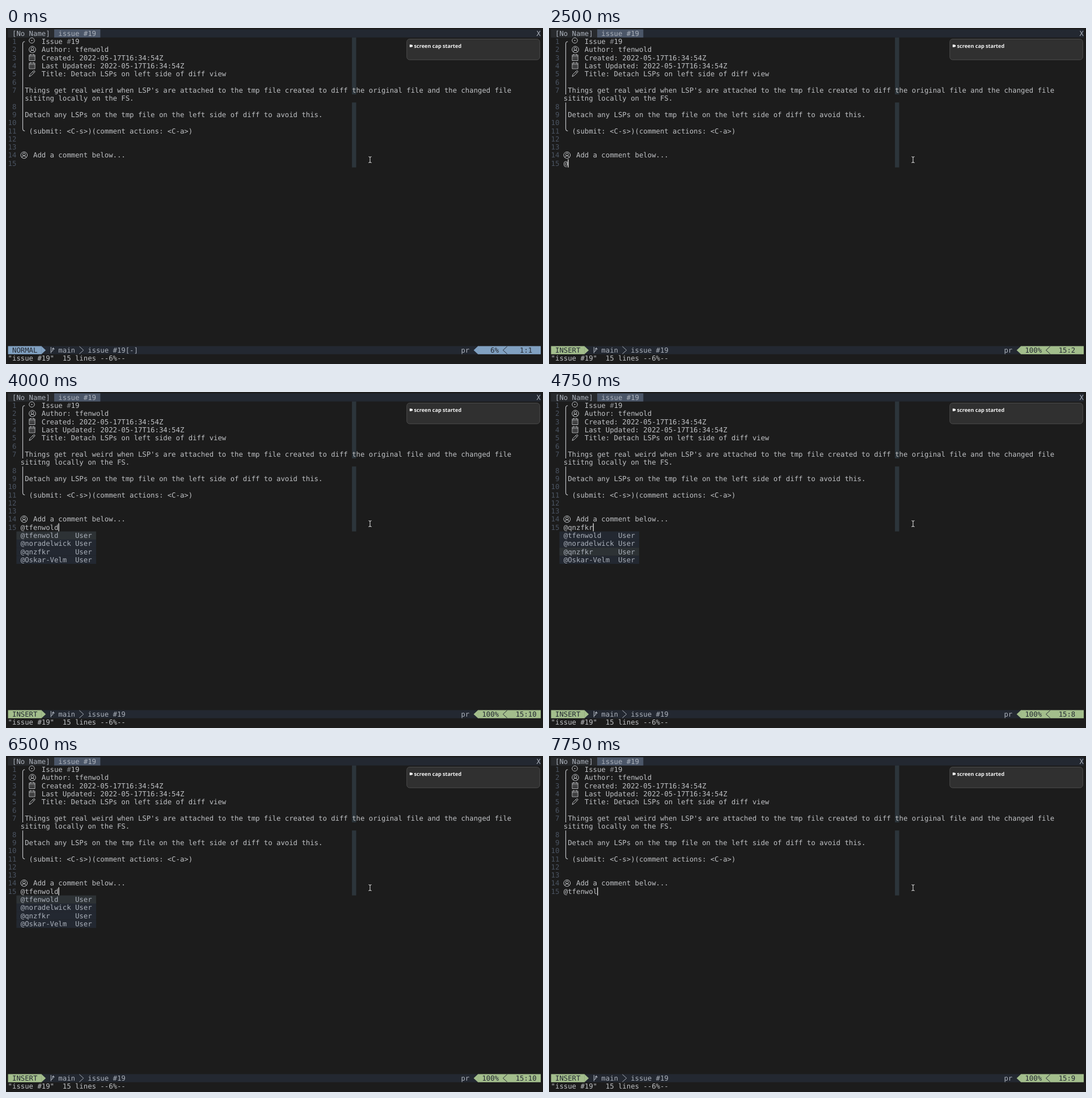
An HTML page with a canvas for the animation above (8000 ms loop, 947 px wide and 592 px high).

```html
<!DOCTYPE html>
<html lang="en">
<head>
<meta charset="utf-8">
<title>Issue editor</title>
<style>
  html, body { margin: 0; width: 100%; height: 100%; overflow: hidden; background: #1c1c1c; }
  canvas { display: block; }
</style>
</head>
<body>
<canvas id="stage" width="947" height="592"></canvas>
<script>
const ctx = document.getElementById('stage').getContext('2d');
const LOOP = 8000;

// Terminal grid
const CELL_W = 7.397, CELL_H = 14.31, LEFT = 3.6, TOP = 2.4, COLS = 127;
const FONT = '12.287px "DejaVu Sans Mono", monospace';
const X = col => LEFT + col * CELL_W;
const Y = row => TOP + row * CELL_H;

const COLOR = {
  bg: '#1c1c1c', text: '#c0c2c5', soft: '#abb1bb', number: '#4b5462', bar: '#232831',
  tab: '#282a2d', tabOn: '#4b5668', ruler: '#2c353b', picked: '#2d3235', cursor: '#e4e4e4',
  NORMAL: '#81a1c1', INSERT: '#a3be8c'
};

const users = ['tfenwold', 'noradelwick', 'qnzfkr', 'Oskar-Velm'];

// [start ms, mode, typed text, selected user (-1: menu closed), cursor visible]
const pick = (time, index, visible = true) => [time, 'INSERT', '@' + users[index], index, visible];
const steps = [
  [0, 'NORMAL', '', -1, false],
  [250, 'NORMAL', '', -1, true],
  [750, 'NORMAL', '', -1, false],
  [1250, 'NORMAL', '', -1, true],
  [2000, 'INSERT', '', -1, true],
  [2500, 'INSERT', '@', -1, true],
  [3500, 'INSERT', '@', -1, false],
  [3750, 'INSERT', '@', -1, true],
  pick(4000, 0), pick(4500, 1), pick(4750, 2), pick(5250, 3), pick(5750, 3, false),
  pick(6000, 2), pick(6250, 1), pick(6500, 0),
  [7250, 'NORMAL', '@' + users[0], -1, true],
  [7500, 'INSERT', '@' + users[0], -1, true],
  [7750, 'INSERT', '@' + users[0].slice(0, -1), -1, true]
];
const JUMP = 1500; // cursor moves from the first line to the last

function write(row, col, text, color = COLOR.text) {
  ctx.fillStyle = color;
  [...text].forEach((char, i) => {
    if (char !== ' ') ctx.fillText(char, X(col + i), Y(row) + 11.4);
  });
}

function fillCells(row, col, cols, color, rows = 1) {
  ctx.fillStyle = color;
  ctx.fillRect(X(col), Y(row), cols * CELL_W, rows * CELL_H);
}

function stroke(path, color = COLOR.text, width = 1) {
  ctx.strokeStyle = color;
  ctx.lineWidth = width;
  ctx.stroke(new Path2D(path));
}

function fill(path, color) {
  ctx.fillStyle = color;
  ctx.fill(new Path2D(path));
}

function circle(x, y, r, filled) {
  ctx.beginPath();
  ctx.arc(x, y, r, 0, Math.PI * 2);
  ctx.fillStyle = ctx.strokeStyle = COLOR.text;
  ctx.lineWidth = 1;
  filled ? ctx.fill() : ctx.stroke();
}

function personIcon(x, y) {
  circle(x, y, 5.8);
  circle(x, y - 1.3, 2.4);
  stroke(`M${x - 3.8} ${y + 4.2}q.6 -3 3.8 -3t3.8 3`);
}

function calendarIcon(x, y) {
  stroke(`M${x - 5} ${y - 4.5}h10v10h-10zM${x - 5} ${y - 2}h10M${x - 2.5} ${y - 6}v2.5M${x + 2.5} ${y - 6}v2.5`);
  ctx.setLineDash([1.4, 1.2]);
  stroke(`M${x - 3.2} ${y + .6}h6.6M${x - 3.2} ${y + 3}h6.6`);
  ctx.setLineDash([]);
}

function drawTabs() {
  fillCells(0, 0, COLS, COLOR.bar);
  fillCells(0, 0, 11, COLOR.tab);
  fillCells(0, 11, 11, COLOR.tabOn);
  write(0, 1, '[No Name]', COLOR.soft);
  write(0, 12, 'issue #19', COLOR.soft);
  write(0, 126, 'X', COLOR.soft);
}

function drawIssue(atTop) {
  fillCells(1, 82, 1, COLOR.ruler, 7);
  fillCells(9, 82, 1, COLOR.ruler, 8);
  for (let n = 1; n <= 15; n++) write(n > 7 ? n + 1 : n, 0, String(n).padStart(2), COLOR.number);

  write(1, 8, 'Issue');
  write(1, 14, '#', '#85878b');
  write(1, 15, '19');
  write(2, 8, 'Author: ' + users[0]);
  write(3, 8, 'Created: 2022-05-17T16:34:54Z');
  write(4, 8, 'Last Updated: 2022-05-17T16:34:54Z');
  write(5, 8, 'Title: Detach LSPs on left side of diff view');
  write(7, 4, "Things get real weird when LSP's are attached to the tmp file created to diff the original file and the changed file");
  write(8, atTop ? 4 : 3, 'sititng locally on the FS.');
  write(10, 4, 'Detach any LSPs on the tmp file on the left side of diff to avoid this.');
  write(12, 5, '(submit: <C-s>)(comment actions: <C-a>)');
  write(15, 6, 'Add a comment below...');

  circle(45.5, 22, 4.7);
  circle(45.5, 22, 1, true);
  personIcon(46.5, 38);
  calendarIcon(46, 52);
  calendarIcon(46, 66.3);
  stroke('M41 85.5l1.2 -3.8l6.5 -6.2q1.3 -.6 2 .4t-.2 2l-6.5 6.2zM47.2 76.8l2 2');
  personIcon(31.8, 224);
}

function drawFrame(atTop, cornerColor) {
  const x = 29.5, end = Y(12);
  stroke(`M33.2 24q-3.7 0 -3.7 4V${Y(2)}`, cornerColor, 1.2);
  stroke(`M${x} ${Y(2)}V${atTop ? end : Y(8)}M${x} ${Y(9)}V${end + 3.2}q0 4 3.7 4`, COLOR.text, 1.2);
}

function drawMenu(selected) {
  users.forEach((user, i) => {
    fillCells(17 + i, 2, 19, i === selected ? COLOR.picked : COLOR.bar);
    write(17 + i, 3, '@' + user, COLOR.soft);
    write(17 + i, 16, 'User', COLOR.soft);
  });
}

function drawStatus(mode, atTop, column) {
  const y = Y(39), middle = y + CELL_H / 2, bottom = y + CELL_H, accent = COLOR[mode];
  fillCells(39, 0, COLS, COLOR.bar);
  fillCells(39, 0, 8, accent);
  fillCells(39, 112, 15, accent);
  fill(`M${X(8) - .3} ${y}L${X(9)} ${middle}L${X(8) - .3} ${bottom}z`, accent);
  fill(`M${X(112) + .3} ${y}L${X(111)} ${middle}L${X(112) + .3} ${bottom}z`, accent);
  stroke(`M${X(17)} ${y + .5}L${X(18)} ${middle}L${X(17)} ${bottom - .5}`, COLOR.soft);
  stroke(`M${X(119)} ${y + .5}L${X(118)} ${middle}L${X(119)} ${bottom - .5}`, COLOR.bar);
  stroke('M79.3 562v11M79.3 570q4 -.5 4 -5.5M81.2 566.3l2.1 -2.6l2.1 2.6', COLOR.soft, 1.1);

  write(39, 1, mode, COLOR.bar);
  write(39, 12, 'main', COLOR.soft);
  write(39, 19, atTop ? 'issue #19[-]' : 'issue #19', COLOR.soft);
  write(39, 108, 'pr', COLOR.soft);
  write(39, 113, atTop ? '  6%' : '100%', COLOR.bar);
  write(39, 120, (atTop ? '1' : '15').padStart(3) + ':' + column, COLOR.bar);
  write(40, 0, '"issue #19"  15 lines --6%--');
}

function drawNotification() {
  ctx.beginPath();
  ctx.roundRect(706.8, 19.5, 234.5, 36.5, 5);
  ctx.fillStyle = '#303030';
  ctx.fill();
  ctx.strokeStyle = '#4c4c4c';
  ctx.lineWidth = 1;
  ctx.stroke();
  fill('M711.8 29.3h3.6v1l1.7 -.6v3.6l-1.7 -.6v1h-3.6z', '#f0f0f0');
  ctx.font = 'bold 9.1px "Open Sans", sans-serif';
  ctx.fillStyle = '#f4f4f4';
  ctx.fillText('screen cap started', 719.5, 34.7);
  ctx.font = FONT;
}

function drawPointer() {
  const beam = 'M639.3 226.7q2.7 0 2.7 1.5q0 -1.5 2.7 -1.5M642 228v8M639.3 237.3q2.7 0 2.7 -1.5q0 1.5 2.7 1.5';
  stroke(beam, '#111', 2.6);
  stroke(beam, '#e0e0e0', 1.1);
}

function render(time) {
  const [, mode, line, selected, visible] = steps.findLast(step => step[0] <= time);
  const atTop = time < JUMP;
  const insert = mode === 'INSERT';
  const column = insert ? line.length + 1 : Math.max(1, line.length);
  const row = atTop ? 1 : 16;
  const block = visible && !insert;

  ctx.fillStyle = COLOR.bg;
  ctx.fillRect(0, 0, 947, 592);
  ctx.font = FONT;
  ctx.textRendering = 'geometricPrecision';

  drawTabs();
  drawIssue(atTop);
  write(16, 3, line);
  if (block) {
    fillCells(row, column + 2, 1, COLOR.cursor);
    write(row, column + 2, line.slice(column - 1), COLOR.bg);
  } else if (visible) {
    fillCells(row, column + 2, 0.18, COLOR.cursor);
  }
  drawFrame(atTop, block && atTop ? COLOR.bg : COLOR.text);
  if (selected >= 0) drawMenu(selected);
  drawStatus(mode, atTop, column);
  drawNotification();
  drawPointer();
}

function tick() {
  render(performance.now() % LOOP);
  requestAnimationFrame(tick);
}
tick();
</script>
</body>
</html>
```
